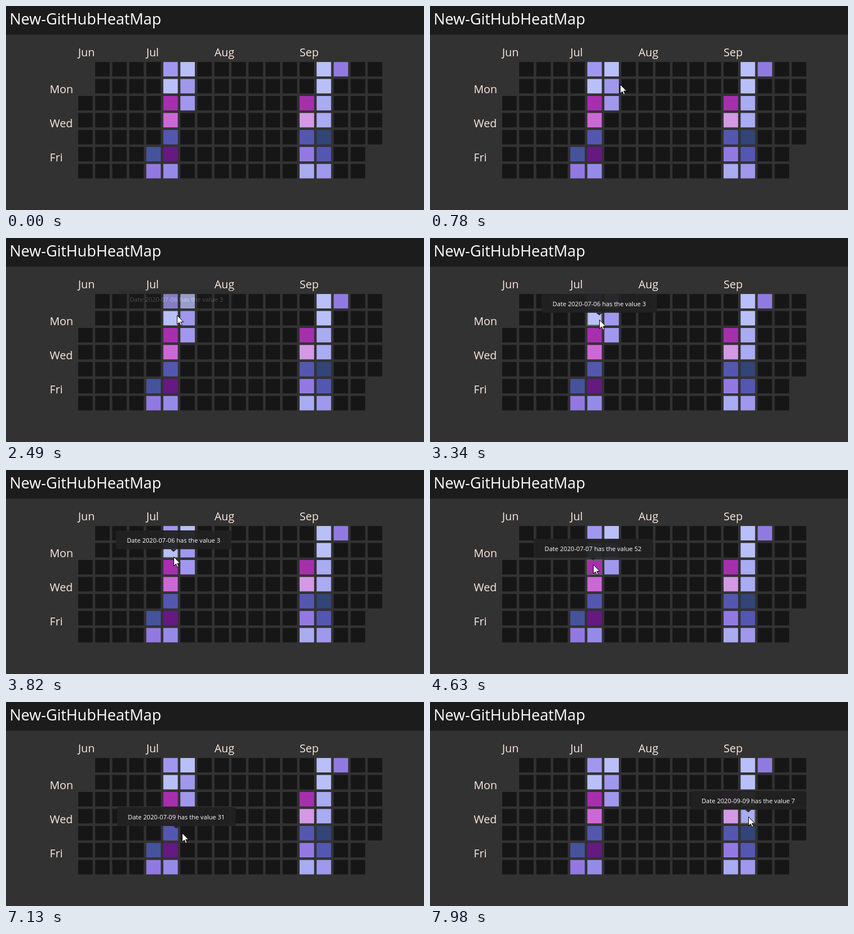
An HTML page that plays this animation: 746x365 px, repeating every 8 s.

```html
<!DOCTYPE html>
<html lang="en">
<head>
<meta charset="utf-8">
<title>New-GitHubHeatMap</title>
<style>
  html, body { margin: 0; width: 100%; height: 100%; overflow: hidden; background: #323232; }
  svg { display: block; width: 746px; height: 365px; font-family: "Open Sans", "Noto Sans", sans-serif; }
  .title { font-size: 27.15px; fill: #fff; }
  .axis { font-size: 19.8px; fill: #fbe8de; }
  .tip rect, .tip path { fill: #212121; fill-opacity: .95; }
  .tip text { font-size: 11.15px; fill: #fff; text-anchor: middle; }
  .ring { fill: none; stroke: #626262; stroke-width: 2; }
  .cursor { fill: #fff; stroke: #000; stroke-width: 1; }
</style>
</head>
<body>
<svg viewBox="0 0 746 365">
  <rect width="746" height="365" fill="#323232"/>
  <rect width="746" height="51" fill="#1c1c1c"/>
  <rect y="51" width="746" height="1" fill="#292929"/>
  <text class="title" x="6.4" y="32.5">New-GitHubHeatMap</text>
  <g id="axis" class="axis"></g>
  <g id="cells"></g>
  <rect id="ring" class="ring" opacity="0"/>
  <g id="tip" class="tip" opacity="0">
    <rect id="box" y="-46" height="33.7" rx="3"/>
    <path d="M-5.5 -12.3H5.5L0 -7.5Z"/>
    <text id="label" y="-24"></text>
  </g>
  <path id="cursor" class="cursor" visibility="hidden" d="M.5 .5V16.5L4.2 13L6.7 18.7L9.2 17.6L6.7 12.1H11.7Z"/>
</svg>
<script>
const LOOP = 8000, PITCH = 30.4, SIZE = 25.8, INSET = 2.5, FADE_IN = 250, FADE_OUT = 200;
const byId = id => document.getElementById(id);
const setAll = (node, attrs) => Object.entries(attrs).forEach(([name, value]) => node.setAttribute(name, value));
const weekX = week => 128.8 + week * PITCH;
const dayY = day => 100.2 + day * PITCH;

const colors = {
  a: '#b9c0f9', b: '#a9abf3', c: '#a098ee', d: '#9279e2', e: '#968ae8', f: '#5457b0',
  g: '#46529a', h: '#334477', i: '#641a80', j: '#a62fae', k: '#cb68d6', l: '#d399e5'
};
// Busy weeks, one letter per day from Sunday.
const weeks = { 4: '     gd', 5: 'cajkfie', 6: 'acc', 13: '  jlfdb', 14: 'aabbhfc', 15: 'd' };
const firstDay = 2, lastDay = 17 * 7 + 4;

let cells = '';
for (let n = firstDay; n <= lastDay; n++) {
  const week = Math.floor(n / 7), day = n % 7;
  const fill = colors[weeks[week]?.[day]] ?? '#161616';
  cells += `<rect x="${weekX(week)}" y="${dayY(day)}" width="${SIZE}" height="${SIZE}" fill="${fill}"/>`;
}
byId('cells').innerHTML = cells;

const axisText = (x, y, name) => `<text x="${x}" y="${y}">${name}</text>`;
byId('axis').innerHTML =
  Object.entries({ Jun: 0, Jul: 4, Aug: 8, Sep: 13 }).map(([name, week]) => axisText(weekX(week), 90, name)).join('') +
  ['Mon', 'Wed', 'Fri'].map((name, i) => axisText(78, 156 + i * 2 * PITCH, name)).join('');

// Pointer moves, each drawn in a number of steps; the picture rests between them.
const entry = { x: 561, y: 364 };
const moves = [
  { start: 70, end: 860, steps: 12, x: 339, y: 140 },
  { start: 930, end: 1310, steps: 6, x: 324, y: 135 },
  { start: 2110, end: 2720, steps: 9, x: 304, y: 138 },
  { start: 3260, end: 4060, steps: 11, x: 299, y: 155 },
  { start: 4140, end: 4770, steps: 9, x: 291, y: 169 },
  { start: 5390, end: 5960, steps: 8, x: 291, y: 199 },
  { start: 6360, end: 6590, steps: 4, x: 291, y: 238 },
  { start: 6880, end: 6880, steps: 1, x: 291, y: 238 },
  { start: 7130, end: 7130, steps: 1, x: 314, y: 234 },
  { start: 7205, end: 7430, steps: 4, x: 573, y: 207 },
  { start: 7590, end: 7660, steps: 2, x: 570, y: 206 },
  { start: 7980, end: 7980, steps: 1, x: 568, y: 205 }
];
const hovers = [
  { from: 930, week: 6, day: 1, value: 13 },
  { from: 2435, week: 5, day: 1, value: 3 },
  { from: 4130, week: 5, day: 2, value: 52 },
  { from: 5470, week: 5, day: 3, value: 65 },
  { from: 6430, week: 5, day: 4, value: 31 },
  { from: 7330, week: 14, day: 3, value: 7 }
];

const clamp = (v, low, high) => Math.min(Math.max(v, low), high);
const inCell = (v, low) => clamp(v, low + INSET, low + SIZE - INSET);
const easeOut = p => 1 - (1 - p) ** 3;
const dateOf = ({ week, day }) => new Date(Date.UTC(2020, 4, 31 + week * 7 + day)).toISOString().slice(0, 10);
const moveTo = (node, x, y) => node.setAttribute('transform', `translate(${Math.round(x)} ${Math.round(y)})`);

// Pointer position and the time of the step last drawn.
function pointerAt(time) {
  const index = moves.findLastIndex(move => move.start <= time);
  if (index < 0) return { ...entry, t: 0 };
  const move = moves[index], origin = moves[index - 1] ?? entry;
  const gap = (move.end - move.start) / (move.steps - 1) || 1;
  const step = Math.min(Math.floor((time - move.start) / gap + .1), move.steps - 1);
  const p = easeOut((step + 1) / move.steps);
  return {
    x: origin.x + (move.x - origin.x) * p,
    y: origin.y + (move.y - origin.y) * p,
    t: move.start + step * gap
  };
}

function draw(time) {
  const { x, y, t } = pointerAt(time);
  byId('cursor').setAttribute('visibility', t ? 'visible' : 'hidden');
  moveTo(byId('cursor'), x, y);

  const index = Math.max(0, hovers.findLastIndex(item => item.from <= t));
  const hover = hovers[index], until = hovers[index + 1]?.from ?? Infinity;
  const alpha = clamp(Math.min((t - hover.from) / FADE_IN, (until - t) / FADE_OUT), 0, 1);
  const left = weekX(hover.week), top = dayY(hover.day);
  const tipX = inCell(x, left), tipY = inCell(y, top);
  const width = hover.value > 9 ? 212 : 206;
  moveTo(byId('tip'), tipX, tipY);
  byId('tip').setAttribute('opacity', alpha);
  setAll(byId('box'), { x: -width / 2, width });
  byId('label').textContent = `Date ${dateOf(hover)} has the value ${hover.value}`;

  const inside = tipX === x && tipY === y;
  setAll(byId('ring'), { x: left, y: top, width: SIZE, height: SIZE, opacity: inside ? Math.min(1, alpha * 3) : alpha * .3 });
}

const begin = performance.now();
function tick() {
  draw((performance.now() - begin) % LOOP);
  requestAnimationFrame(tick);
}
tick();
</script>
</body>
</html>
```
